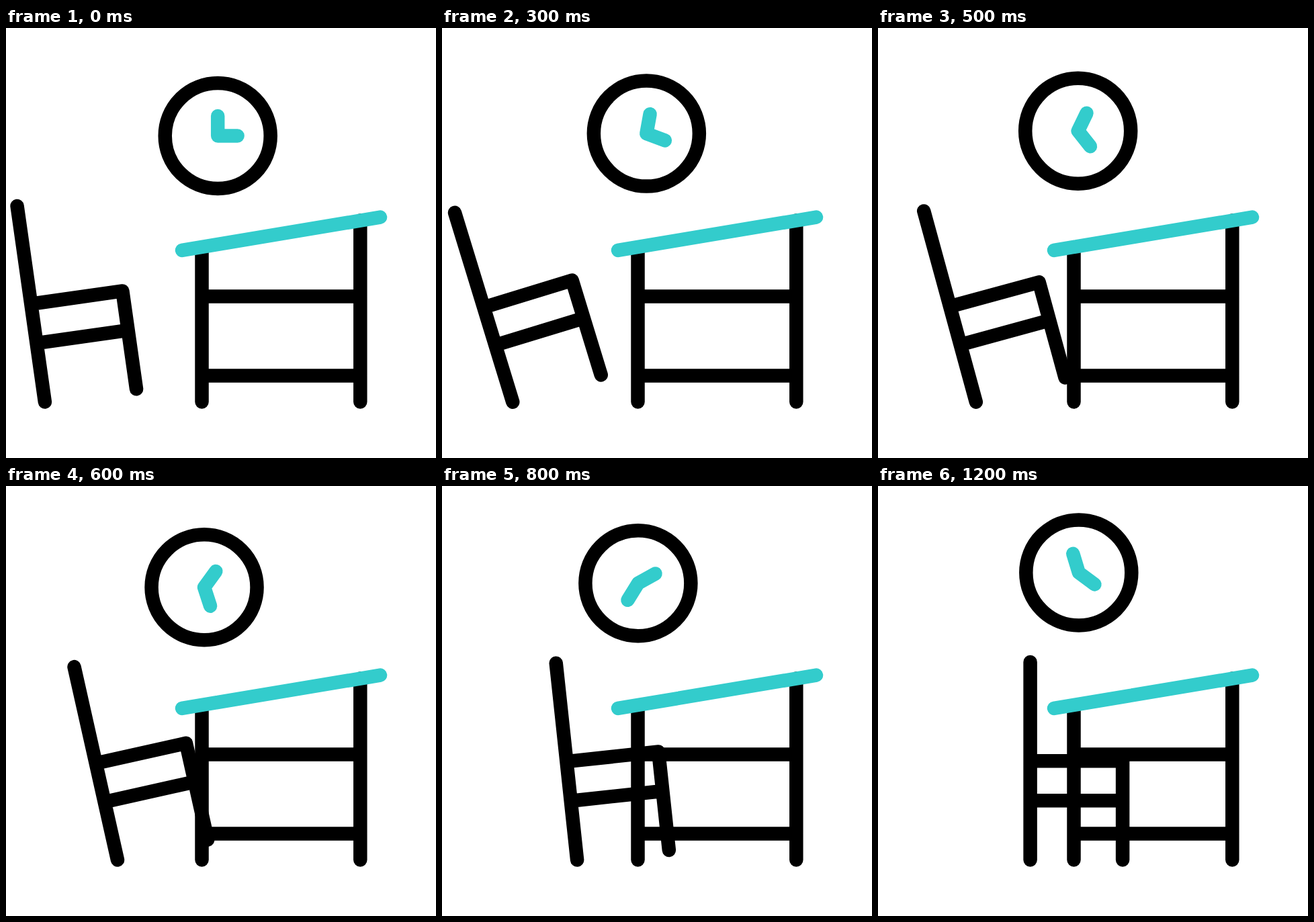
These frames come from a looping animation (640x640 px, 1.3 s). An HTML page:

```html
<!DOCTYPE html>
<html lang="en">
<head>
<meta charset="utf-8">
<title>Desk, chair and clock</title>
<style>
  html, body { margin: 0; width: 100%; height: 100%; overflow: hidden; background: #fff; }
  svg { display: block; width: 100%; height: 100%; }
  svg * { fill: none; stroke-width: 20.5; stroke-linecap: round; stroke-linejoin: round; }
  .dark { stroke: #000; }
  .teal { stroke: #3cc; }
</style>
</head>
<body>
<svg viewBox="0 0 640 640">
  <!-- chair: origin at the foot of its back leg -->
  <path id="chair" class="dark" d="M0 0V-294.6M0-147.3H137.5V0M0-88.4H137.5"/>
  <path class="dark" d="M291.5 328V556.6M527.3 286.6V556.6M291.5 399.4H527.3M291.5 517.4H527.3"/>
  <path class="teal" d="M262 330.9L557 281.6"/>
  <g id="clock">
    <circle class="dark" r="78.5"/>
    <path id="hands" class="teal"/>
  </g>
</svg>
<script>
const LOOP = 1300, STEP = 100;
const $ = id => document.getElementById(id);

// Smooth 0 to 1 between two times
function ease(time, start, end) {
  const p = Math.min(1, Math.max(0, (time - start) / (end - start)));
  return p * p * (3 - 2 * p);
}

function place(id, x, y, angle = 0) {
  $(id).setAttribute('transform', `translate(${x} ${y}) rotate(${angle})`);
}

function tip(degrees) {
  const a = degrees * Math.PI / 180;
  return `${29.4 * Math.cos(a)} ${29.4 * Math.sin(a)}`;
}

function draw() {
  const time = Math.floor(performance.now() % LOOP / STEP) * STEP;
  const s = time / 1000;

  // The chair slides in, rocking back up from its tilt; both began before the loop.
  const slide = ease(time, -200, 1110);
  const tilt = ease(time, -313, 340) - ease(time, 340, 1110);
  place('chair', 46.6 + 180 * slide, 556.6, -17.2 * tilt);

  // The clock drifts along a curve while its hands speed up.
  const x = 315.2 - 33.75 * s - 16.25 * s ** 2 + 27.5 * s ** 3;
  const y = 160.5 - 6.25 * s - 16.75 * s ** 2;
  const turn = 12.2 * s + 193.9 * s ** 2 - 23.6 * s ** 3;
  place('clock', x, y);
  $('hands').setAttribute('d', `M${tip(turn / 2 - 90)}L0 0L${tip(turn)}`);

  requestAnimationFrame(draw);
}
draw();
</script>
</body>
</html>
```
